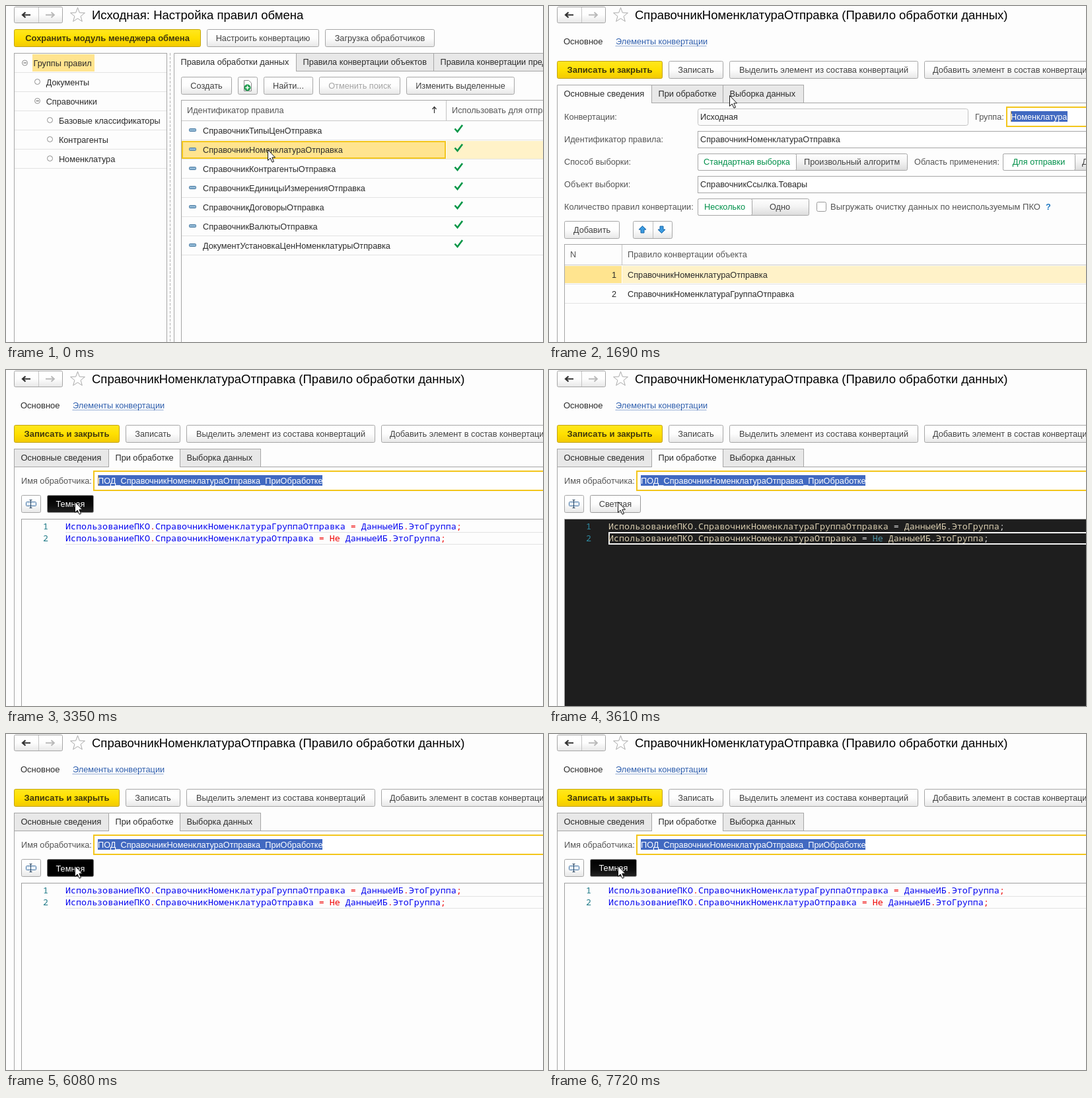
Recreate the animation shown at these times as an HTML page. Size 813 px wide and 508 px high, loop 7.99 s.

```html
<!DOCTYPE html>
<html lang="ru">
<head>
<meta charset="utf-8">
<title>Правила обмена</title>
<style>
html, body { margin: 0; width: 100%; height: 100%; overflow: hidden; background: #fdfdfd; }
svg { display: block; width: 100vw; height: 100vh; }
text { font: 12.72px "Liberation Sans", Arial, sans-serif; fill: #2b2b2b; white-space: pre; }
.title { font-size: 18.53px; fill: #000; }
.bold { font-weight: bold; font-size: 13px; fill: #40380c; }
.wide { font-size: 13px; }
.label { fill: #555; }
.push { fill: #404040; }
.off { fill: #a3a3a3; }
.green { fill: #00904a; }
.white { fill: #fff; }
.link { fill: #2f5fae; }
.help { fill: #1f78c1; font-weight: bold; }
.code { font: 13.333px "Noto Sans Mono", "DejaVu Sans Mono", monospace; }
</style>
</head>
<body>
<svg id="stage" viewBox="0 0 813 508" xmlns="http://www.w3.org/2000/svg">
  <defs>
    <linearGradient id="plain" x2="0" y2="1"><stop stop-color="#fff"/><stop offset=".5" stop-color="#fdfdfd"/><stop offset="1" stop-color="#e7e7e7"/></linearGradient>
    <linearGradient id="gray" x2="0" y2="1"><stop stop-color="#fff"/><stop offset=".45" stop-color="#f4f4f4"/><stop offset="1" stop-color="#dcdcdc"/></linearGradient>
    <linearGradient id="down" x2="0" y2="1"><stop stop-color="#d2d2d2"/><stop offset="1" stop-color="#e6e6e6"/></linearGradient>
    <linearGradient id="gold" x2="0" y2="1"><stop stop-color="#ffe71f"/><stop offset=".5" stop-color="#ffe000"/><stop offset="1" stop-color="#f2c900"/></linearGradient>
    <linearGradient id="ink" x2="0" y2="1"><stop stop-color="#000"/><stop offset=".6" stop-color="#0c0c0c"/><stop offset="1" stop-color="#242424"/></linearGradient>
  </defs>
</svg>
<script>
const LOOP = 7990;
const EDGE = '#a6a6a6', SOFT = '#e3e3e3', AMBER = '#f3c61c', PICK = '#ffe48f', PALE = '#fff2c8', BLUE = '#4169c1';

const fill = (x, y, w, h, color) => `<rect x="${x}" y="${y}" width="${w}" height="${h}" fill="${color}"/>`;
const box = (x, y, r, b, color, edge = EDGE, rx = 0) =>
  `<rect x="${x + .5}" y="${y + .5}" width="${r - x - 1}" height="${b - y - 1}" rx="${rx}" fill="${color}" stroke="${edge}"/>`;
const path = (d, stroke, w = 1, color = 'none') => `<path d="${d}" fill="${color}" stroke="${stroke}" stroke-width="${w}"/>`;
const text = (x, y, s, cls = '', anchor = 'start') => `<text x="${x}" y="${y}" class="${cls}" text-anchor="${anchor}">${s}</text>`;
const mid = (x, y, s, cls) => text(x, y, s, cls, 'middle');
const hline = (x, y, r = 813, color = SOFT) => fill(x, y, r - x, 1, color);
const vline = (x, y, b = 508, color = EDGE) => fill(x, y, 1, b - y, color);

function button(x, y, r, label, kind = 'plain', cls = 'push') {
  const edge = kind === 'gold' ? '#c2a310' : EDGE;
  return box(x, y, r, y + 27, `url(#${kind})`, edge, 2) + mid((x + r) / 2, y + 18, label, cls);
}

function header(title) {
  const star = Array.from({ length: 10 }, (_, i) => {
    const a = i * Math.PI / 5 - Math.PI / 2, r = i % 2 ? 4.8 : 11.5;
    return `${(108.5 + r * Math.cos(a)).toFixed(1)} ${(14 + r * Math.sin(a)).toFixed(1)}`;
  }).join('L');
  return box(12, 1, 86, 26, 'url(#plain)', EDGE, 2) + vline(49, 2, 25, '#c4c4c4')
    + path('M37 13.5H25M29.5 9.5L25 13.5L29.5 17.5', '#333', 2.2)
    + path('M60 13.5H73M68.5 9.5L73 13.5L68.5 17.5', '#b9b9b9', 1.8)
    + path(`M${star}Z`, '#aaa', 1, '#fff') + text(130, 20, title, 'title');
}

// items: [left, right, label, class]; the panel below shares its border with the tabs
function tabs(top, bottom, items, active) {
  let s = hline(items[0][0], bottom, 813, EDGE) + vline(items[0][0], top);
  items.forEach(([x, r, label, cls], i) => {
    s += i === active
      ? fill(x, top, r - x + 1, bottom - top + 1, '#fdfdfd') + path(`M${x + .5} ${bottom + 1}V${top + .5}H${r + .5}V${bottom + 1}`, EDGE)
      : box(x, top, r + 1, bottom + 1, '#e8e8e8');
    s += text(x + 10.5, top + 18, label, cls);
  });
  return s;
}

const node = (x, y, open) => `<circle cx="${x}" cy="${y}" r="4" fill="#fff" stroke="#8c8c8c"/>` + (open ? hline(x - 2, y - .5, x + 2.5, '#555') : '');
const focus = (x) => `<rect x="${x + 1}" y="153" width="200%" height="29" fill="#fff" stroke="${AMBER}" stroke-width="2"/>`;
const selected = (x, w, s) => fill(x, 159, w, 16, BLUE) + text(x, 172, s, 'white');
const field = (y, s) => box(225, y, 830, y + 26, '#fff') + text(229, y + 17, s);

function choice(x, y, split, r, on, other, otherX) {
  return box(x, y, r, y + 26, 'url(#gray)', EDGE, 2) + box(x, y, split + 1, y + 26, '#fff', EDGE, 2)
    + mid((x + split) / 2, y + 17, on, 'green') + text(otherX, y + 17, other, 'push');
}

function listScene() {
  let s = header('Исходная: Настройка правил обмена')
    + button(12, 35, 295, 'Сохранить модуль менеджера обмена', 'gold', 'bold')
    + button(304, 35, 474, 'Настроить конвертацию') + button(483, 35, 649, 'Загрузка обработчиков')
    + box(12, 71, 244, 520, '#fdfdfd') + fill(40, 73, 94, 26, PICK);
  const tree = [[0, 'Группы правил', 1], [1, 'Документы'], [1, 'Справочники', 1], [2, 'Базовые классификаторы'], [2, 'Контрагенты'], [2, 'Номенклатура']];
  tree.forEach(([depth, label, open], i) => {
    s += node(28.5 + depth * 19, 86 + i * 29 - (i ? .5 : 0), open) + text(41.5 + depth * 19.2, 91 + i * 29, label) + hline(13, 100 + i * 29, 243);
  });
  s += '<path d="M248.5 71V508" stroke="#b5b5b5" stroke-dasharray="4 2"/>'
    + tabs(71, 98, [[254, 439, 'Правила обработки данных'], [439, 647, 'Правила конвертации объектов'], [647, 900, 'Правила конвертации предопределенных данных']], 0)
    + button(265, 107, 342, 'Создать') + button(351, 107, 381, '')
    + path('M360.5 112.5H367.5L371.5 116.5V128.5H360.5Z', '#888', 1, '#fff')
    + '<circle cx="365.5" cy="123.5" r="5" fill="#1d9c4c"/>' + path('M362.5 123.5H368.5M365.5 120.5V126.5', '#fff', 1.6)
    + button(390, 107, 465, 'Найти...') + button(474, 107, 597, 'Отменить поиск', 'plain', 'off') + button(606, 107, 770, 'Изменить выделенные')
    + box(265, 142, 830, 520, '#fdfdfd') + hline(266, 173, 813, '#c9c9c9') + vline(666, 143, 174, '#c2c2c2')
    + text(274, 162, 'Идентификатор правила', 'label') + text(675, 162, 'Использовать для отправки', 'label')
    + path('M648.5 162V153M645.5 156L648.5 152.5L651.5 156', '#333', 1.2);
  const rules = ['СправочникТипыЦен', 'СправочникНоменклатура', 'СправочникКонтрагенты', 'СправочникЕдиницыИзмерения', 'СправочникДоговоры', 'СправочникВалюты', 'ДокументУстановкаЦенНоменклатуры'];
  rules.forEach((name, i) => {
    const y = 174 + i * 29;
    s += hline(266, y + 28);
    if (i === 1) s += fill(667, y + 1, 146, 27, PALE) + `<rect x="267" y="${y + 2}" width="398" height="25" fill="${PICK}" stroke="${AMBER}" stroke-width="2"/>`;
    s += box(277, y + 11, 288, y + 16, '#8fb6d3', '#4a7ba3', 1) + text(298, y + 19, name + 'Отправка')
      + path(`M679.5 ${y + 11.5}L683.5 ${y + 16}L691 ${y + 6}`, '#009646', 2.6);
  });
  return s;
}

const formTabs = (active) => tabs(119, 146, [[12, 155, 'Основные сведения', 'wide'], [155, 263, 'При обработке'], [263, 385, 'Выборка данных']], active);

function formTop() {
  return header('СправочникНоменклатураОтправка (Правило обработки данных)')
    + text(22, 58, 'Основное', 'wide') + text(101, 58, 'Элементы конвертации', 'link')
    + '<path d="M101 60.5H239" stroke="#2f5fae" stroke-dasharray="1 1"/>'
    + button(12, 83, 172, 'Записать и закрыть', 'gold', 'bold') + button(181, 83, 264, 'Записать')
    + button(273, 83, 559, 'Выделить элемент из состава конвертаций') + button(568, 83, 834, '')
    + text(581, 101, 'Добавить элемент в состав конвертации', 'push');
}

function mainTab() {
  let s = formTabs(0);
  ['Конвертации:', 'Идентификатор правила:', 'Способ выборки:', 'Объект выборки:', 'Количество правил конвертации:']
    .forEach((label, i) => s += text(23, 172 + i * 34, label, 'label'));
  const arrow = (x, y, k) => path(`M${x} ${y - 5.5 * k}L${x + 5.5} ${y}H${x + 2.5}V${y + 5 * k}H${x - 2.5}V${y}H${x - 5.5}Z`, '#1565a8', 1, '#3c9be0');
  s += box(225, 155, 635, 181, '#fbfbfb', '#c2c2c2', 3) + text(229, 172, 'Исходная')
    + text(645, 172, 'Группа:', 'label') + focus(692) + selected(699, 86, 'Номенклатура')
    + field(189, 'СправочникНоменклатураОтправка') + field(257, 'СправочникСсылка.Товары')
    + choice(225, 223, 374, 543, 'Стандартная выборка', 'Произвольный алгоритм', 386)
    + text(553, 240, 'Область применения:', 'label') + choice(687, 223, 796, 910, 'Для отправки', 'Для получения', 807)
    + choice(225, 291, 307, 394, 'Несколько', 'Одно', 334)
    + box(405, 296, 420, 311, '#fff', '#999', 2) + text(426, 308, 'Выгружать очистку данных по неиспользуемым ПКО', 'label wide') + text(752, 308, '?', 'help')
    + button(23, 325, 107, 'Добавить') + button(127, 325, 187, '') + vline(157, 326, 351, '#bdbdbd')
    + arrow(141.5, 338, 1) + arrow(170.5, 338, -1)
    + box(23, 360, 830, 520, '#fdfdfd') + hline(24, 391, 813, '#c9c9c9') + vline(110, 361, 392, '#c2c2c2')
    + text(32, 380, 'N', 'label') + text(119, 380, 'Правило конвертации объекта', 'label')
    + fill(24, 393, 86, 26, PICK) + fill(111, 393, 702, 26, PALE) + hline(24, 420) + hline(24, 449);
  ['', 'Группа'].forEach((part, i) => {
    s += text(102, 411 + i * 29, i + 1, '', 'end') + text(119, 411 + i * 29, `СправочникНоменклатура${part}Отправка`);
  });
  return s;
}

function codeTab() {
  return formTabs(1) + text(23, 172, 'Имя обработчика:', 'label') + focus(132)
    + selected(139, 340, 'ПОД_СправочникНоменклатураОтправка_ПриОбработке')
    + button(23, 189, 53, '') + box(30, 199, 46, 206, '#e8f1fa', '#3f6fa0', 1)
    + path('M37.5 196V209M35.5 196.5H39.5M35.5 208.5H39.5', '#23415f');
}

function editor(dark) {
  const c = dark ? { bg: '#1e1e1e', num: '#2f8ca3', id: '#dcd0b2', op: '#d8d8d8', word: '#4f96a8' }
                 : { bg: '#fdfdfd', num: '#1f7a87', id: '#0000f0', op: '#f00000', word: '#f00000' };
  const paint = (s) => s.split(/([.=;]|Не(?= ))/).map(p =>
    `<tspan fill="${p === 'Не' ? c.word : /^[.=;]$/.test(p) ? c.op : c.id}">${p}</tspan>`).join('');
  const lines = ['ИспользованиеПКО.СправочникНоменклатураГруппаОтправка = ДанныеИБ.ЭтоГруппа;',
                 'ИспользованиеПКО.СправочникНоменклатураОтправка = Не ДанныеИБ.ЭтоГруппа;'];
  let s = box(23, 225, 830, 520, c.bg, '#a0a0a0')
    + (dark ? '<rect x="91" y="246" width="800" height="17" fill="none" stroke="#f4f4f4" stroke-width="2"/>'
            : hline(90, 245) + hline(90, 263));
  lines.forEach((line, i) => {
    const y = 240.5 + i * 18.7;
    s += `<text class="code" x="56" y="${y}" style="fill:${c.num}">${i + 1}</text><text class="code" x="90" y="${y}">${paint(line)}</text>`;
  });
  return s;
}

function themeButton(dark, pressed) {
  const base = pressed ? 208 : 207, edge = pressed ? '#777' : '#999';
  return dark
    ? box(62, 189, 139, 216, `url(#${pressed ? 'down' : 'plain'})`, edge, 2) + mid(100.5, base, 'Светлая', 'push')
    : box(62, 189, 133, 216, pressed ? '#000' : 'url(#ink)', edge, 2) + mid(97.5, base, 'Темная', 'white');
}

const stage = document.getElementById('stage');
function layer(markup) {
  const g = document.createElementNS('http://www.w3.org/2000/svg', 'g');
  g.innerHTML = markup;
  return stage.appendChild(g);
}
const show = (g, on) => g.setAttribute('visibility', on ? 'visible' : 'hidden');

const list = layer(listScene()), form = layer(formTop()), main = layer(mainTab()), code = layer(codeTab());
const editors = [false, true].map(d => layer(editor(d)));
const themes = [false, true].map(d => [false, true].map(p => layer(themeButton(d, p))));
const caret = layer(fill(0, 159, 1, 16, '#be963e'));
const cursor = layer(path('M.5 .5V16.5L4.2 13L7 19.2L9.5 18.2L6.8 12H11.5Z', '#111', 1, '#fff'));

const moves = [[0, 396, 217], [1240, 417, 163], [1390, 379, 149], [1540, 317, 140], [1690, 273, 135], [1840, 254, 131], [1990, 230, 129],
  [2390, 228, 129], [2510, 225, 130], [2660, 205, 143], [2785, 140, 178], [2910, 106, 198], [3060, 104, 199]];
const blinks = [500, 1240, 1690, 2785, 3350, 3610, 4190, 4740, 5150, 5560, 6230, 6800, 7180, 7720];
const presses = [[3490, 3610], [4880, 5150], [6080, 6230], [7060, 7180]];

function update(t) {
  const inCode = t >= 2240;
  const dark = presses.filter(p => t >= p[1]).length % 2;
  const pressed = +presses.some(([a, b]) => t >= a && t < b);
  show(list, t < 500);
  show(form, t >= 500);
  show(main, t >= 500 && !inCode);
  show(code, inCode);
  editors.forEach((g, i) => show(g, inCode && i === dark));
  themes.forEach((pair, i) => pair.forEach((g, j) => show(g, inCode && i === dark && j === pressed)));
  show(caret, blinks.filter(b => t >= b).length % 2);
  caret.setAttribute('transform', `translate(${inCode ? 139 : 699})`);
  const [, x, y] = moves.filter(m => t >= m[0]).pop();
  cursor.setAttribute('transform', `translate(${x} ${y})`);
}

const start = performance.now();
function tick() {
  update((performance.now() - start) % LOOP);
  requestAnimationFrame(tick);
}
tick();
</script>
</body>
</html>
```
